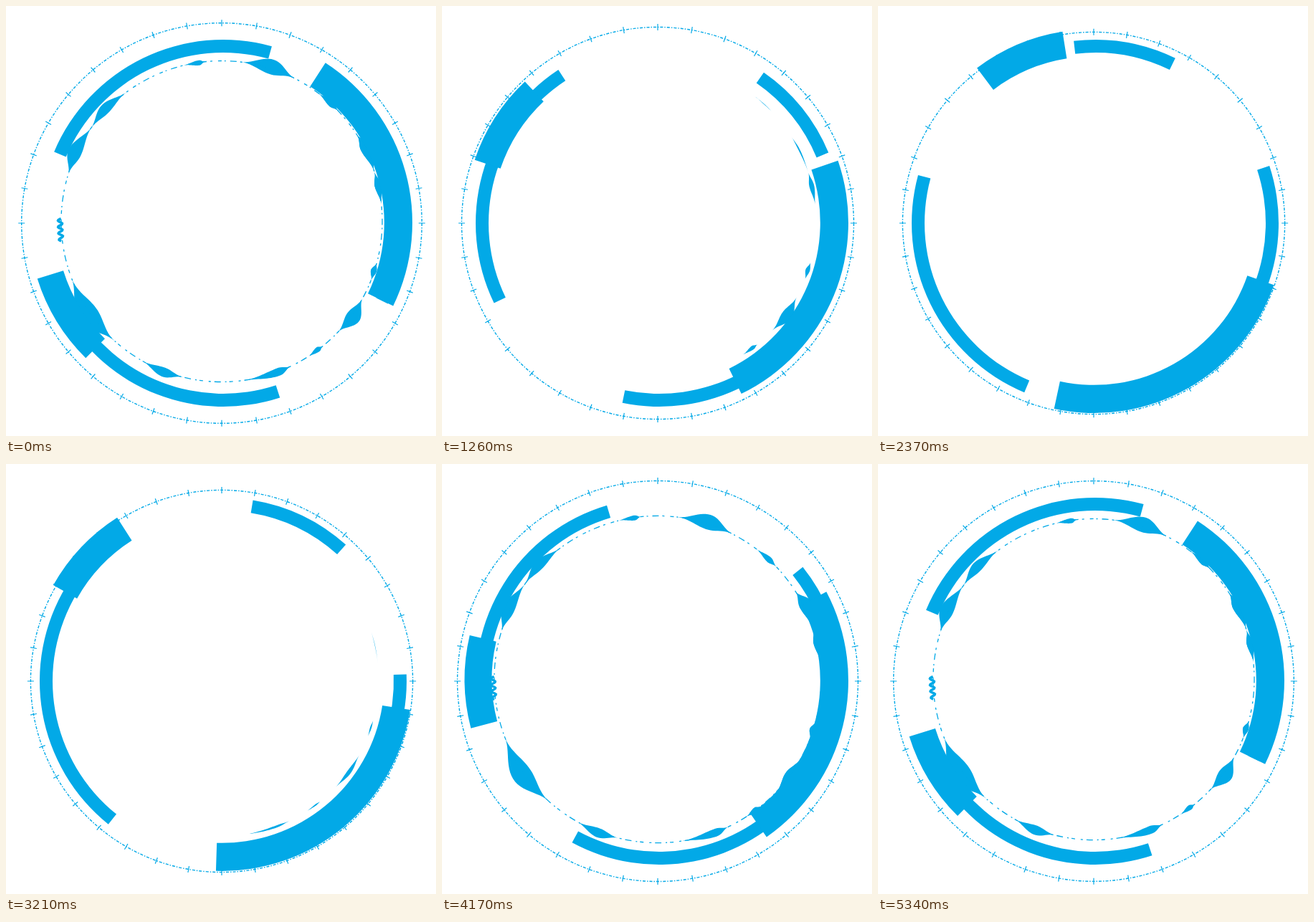
Recreate the animation shown at these times as an HTML page with a canvas. Size 600 by 600 pixels, loop 5.37 s.

```html
<!DOCTYPE html>
<html>
<head>
<meta charset="utf-8">
<style>
html, body { margin: 0; height: 100%; overflow: hidden; background: #fff; }
canvas { display: block; }
</style>
</head>
<body>
<canvas id="stage" width="600" height="600"></canvas>
<script>
const ctx = document.getElementById('stage').getContext('2d');
const LOOP = 5370, STEP = 30, RAD = Math.PI / 180, COLOR = '#02a9e7';

const clamp = x => Math.min(1, Math.max(0, x));
const ease = x => (1 - Math.cos(Math.PI * clamp(x))) / 2;

// Swings from 0 to 1 at time `peak`, then back to 0 at the end of the loop.
function swing(t, peak) {
  const s = (t - STEP + LOOP) % LOOP;
  return s < peak ? ease(s / peak) : 1 - ease((s - peak) / (LOOP - peak));
}

// Eased interpolation through [time, value] pairs.
function track(t, keys) {
  let i = 0;
  while (i < keys.length - 2 && t >= keys[i + 1][0]) i++;
  const [t0, v0] = keys[i], [t1, v1] = keys[i + 1];
  return v0 + (v1 - v0) * ease((t - t0) / (t1 - t0));
}

function band(x, y, inner, outer, from, to) {
  ctx.beginPath();
  ctx.arc(x, y, outer, from * RAD, to * RAD);
  ctx.arc(x, y, inner, to * RAD, from * RAD, true);
  ctx.fill();
}

function circle(x, y, r, width, dash) {
  ctx.lineWidth = width;
  ctx.setLineDash(dash);
  ctx.beginPath();
  ctx.arc(x, y, r, 0, 2 * Math.PI);
  ctx.stroke();
  ctx.setLineDash([]);
}

function tickRing(r) {
  circle(301, 303, r, 1.4, [4, 2, 1.5, 2]);
  ctx.beginPath();
  for (let a = 0; a < 360; a += 10) {
    const c = Math.cos(a * RAD), s = Math.sin(a * RAD);
    ctx.moveTo(301 + c * (r - 4.5), 303 + s * (r - 4.5));
    ctx.lineTo(301 + c * (r + 4.5), 303 + s * (r + 4.5));
  }
  ctx.lineWidth = 1.2;
  ctx.stroke();
}

// Swellings of the inner ring: start angle, end angle, peak angle, outward, inward.
const swellings = [
  [-83, -63, -72, 13, 8], [-104, -96, -98, 3, 4], [215.5, 233.5, 224, 9, 5],
  [197, 216, 205, 12, 7], [132, 159, 145, 18, 11], [104, 119.5, 111, 8, 5],
  [64.5, 82, 69, 6, 5], [51, 57.5, 53, 3, 4], [28.7, 43.6, 36, 13, 7],
  [15, 21.5, 18, 3, 5], [-18, -6, -13, 4, 5], [-32.5, -18, -27, 12, 6],
  [-53, -43.5, -47, 4, 4]
];

function swelling([from, to, peak, out, inn], r, size) {
  const N = 24;
  ctx.beginPath();
  for (let i = 0; i <= 2 * N; i++) {
    const outer = i <= N;
    const a = from + (to - from) * (outer ? i : 2 * N - i) / N;
    const u = a < peak ? (a - from) / (peak - from) : (to - a) / (to - peak);
    const d = r + (outer ? out : -inn) * size * ease(u);
    ctx.lineTo(301 + d * Math.cos(a * RAD), 300.5 + d * Math.sin(a * RAD));
  }
  ctx.fill();
}

function squiggle(r, size) {
  ctx.beginPath();
  for (let a = 173; a <= 181; a += 0.25) {
    const d = r + 1.5 + 3 * Math.sin((a - 173) * 2.8);
    ctx.lineTo(301 + d * Math.cos(a * RAD), 300.5 + d * Math.sin(a * RAD));
  }
  ctx.lineWidth = 3.5 * size;
  ctx.stroke();
}

function innerRing(t, turn) {
  const r = track(t, [[0, 224], [2700, 217], [4800, 231], [LOOP, 224]]);
  const shown = track(t, [[0, 1], [300, 1], [1500, 0], [3050, 0], [4400, 1], [LOOP, 1]]);
  if (shown <= 0) return;

  for (const s of swellings) {
    const size = clamp(shown * 1.4 - 0.2 + 0.2 * Math.cos(s[2] * RAD));
    if (size > 0.04) swelling(s, r, size);
  }
  if (shown > 0.4) squiggle(r, shown);
  if (shown > 0.93) circle(301, 300.5, r, 1.3, [5, 4, 2, 6, 9, 5, 3, 8]);

  // The swellings stay full next to the wide band.
  ctx.save();
  ctx.beginPath();
  ctx.moveTo(301, 303);
  ctx.arc(301, 303, 280, (turn - 57) * RAD, (turn + 26) * RAD);
  ctx.clip();
  for (const s of swellings) swelling(s, r, clamp(shown * 8));
  ctx.restore();
}

function draw(t) {
  ctx.fillStyle = '#fff';
  ctx.fillRect(0, 0, 600, 600);
  ctx.fillStyle = ctx.strokeStyle = COLOR;

  const wide = 76.7 * swing(t, 2470);
  const short = 99.9 * swing(t, 2080);
  const thin = -90.2 * swing(t, 2340);

  tickRing(track(t, [[0, 279.3], [2760, 266], [3000, 266], [4830, 285], [LOOP, 279.3]]));
  innerRing(t, wide);
  for (const [from, to] of [[202.9, 285.4], [72, 150.3], [-6.5, 26.1]])
    band(303, 303, 238, 256, from + thin, to + thin);
  band(299.5, 300.5, 230, 268, 134.6 + short, 162.6 + short);
  band(301.3, 302.3, 226.5, 265.7, -57.1 + wide, 25.9 + wide);
}

const start = performance.now();
function frame() {
  const t = (performance.now() - start) % LOOP;
  draw(Math.floor(t / STEP) * STEP);
  requestAnimationFrame(frame);
}
frame();
</script>
</body>
</html>
```
